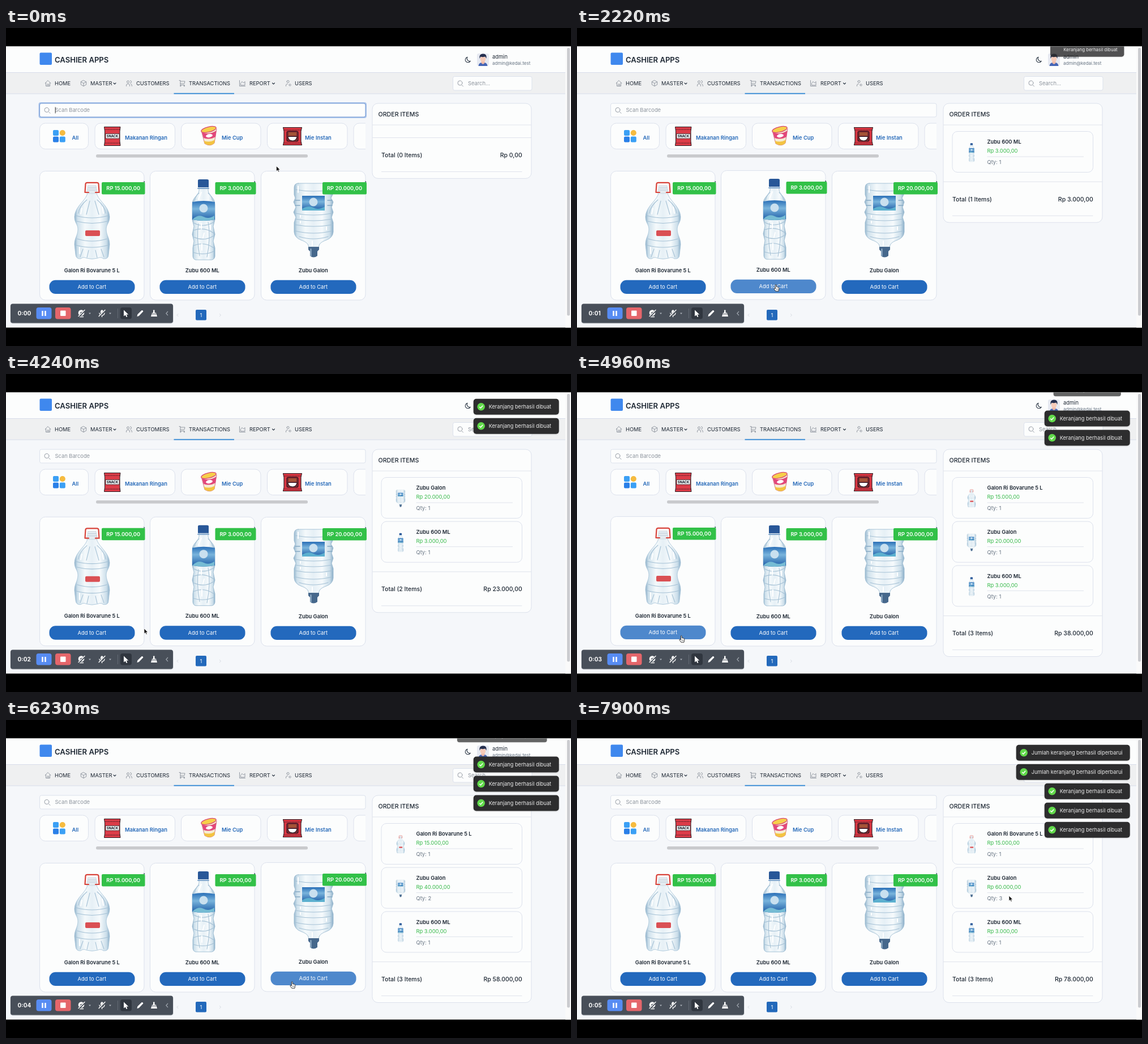
Recreate the animation shown at these times as an HTML page. Size 998x561 px, loop 8 s.

```html
<!DOCTYPE html>
<html lang="id">
<head>
<meta charset="utf-8">
<title>Cashier Apps</title>
<style>
  html, body { margin: 0; width: 100%; height: 100%; overflow: hidden; background: #000; }
  svg { display: block; width: 998px; height: 561px; }
  text { font: 400 9.33px Inter, "Open Sans", sans-serif; fill: #1d2733; white-space: pre; }
  .semi { font-weight: 600; }
  .big { font-size: 10.67px; font-weight: 500; }
  .mid { text-anchor: middle; }
  .end { text-anchor: end; }
  .white { fill: #fff; }
  .blue { fill: #2468b8; }
  .green { fill: #35b948; }
  .soft { fill: #667382; }
  .hint { fill: #8d949d; }
  .box { fill: #fcfdfd; stroke: #dce1ec; }
  .rule { stroke: #dfe3ec; fill: none; }
  .icon { fill: none; stroke: #858c96; stroke-width: .85; stroke-linecap: round; stroke-linejoin: round; }
  .rib { fill: none; stroke: #a5c1d5; stroke-width: 1.1; }
  .shine { fill: none; stroke: #fff; stroke-width: 2; }
</style>
</head>
<body>
<svg viewBox="0 0 998 561">
  <defs>
    <clipPath id="screen"><rect y="32.5" width="998" height="496"/></clipPath>
    <clipPath id="strip"><rect x="58" y="160" width="577" height="60"/></clipPath>
    <linearGradient id="glass">
      <stop offset="0" stop-color="#8fb1ca"/><stop offset=".09" stop-color="#cfe1ec"/>
      <stop offset=".3" stop-color="#f4f9fb"/><stop offset=".5" stop-color="#e6f0f6"/>
      <stop offset=".72" stop-color="#f6fafc"/><stop offset=".91" stop-color="#cbdeea"/>
      <stop offset="1" stop-color="#8baec8"/>
    </linearGradient>
    <linearGradient id="label" x2="0" y2="1">
      <stop offset="0" stop-color="#2a6fb7"/><stop offset=".4" stop-color="#79b4dc"/>
      <stop offset="1" stop-color="#1c5ba6"/>
    </linearGradient>

    <g id="bottle0" stroke-linecap="round">
      <path d="M144 290C144 303 122 313 121 333C121 344 127 346 127 355C127 366 121 370 121 382L123 400Q124 408 132 407Q137 403 142 406Q152 409 162 406Q167 403 172 407Q181 408 181 400L183 382C183 370 177 366 177 355C177 346 183 344 183 333C182 313 160 303 160 290Z" fill="url(#glass)" stroke="#a3c1d6" stroke-width=".8"/>
      <path class="rib" d="M123 331Q152 339 181 331M125 341Q152 348 179 341M126 372Q152 380 178 372M123 383Q152 391 181 383M131 404L136 390M143 405L146 392M161 405L158 392M173 404L168 390M143 303Q129 315 128 327M161 303Q175 315 176 327M148 305L142 329M157 305L164 329"/>
      <path class="shine" d="M134 318L132 328M170 316L172 327M130 387V398"/>
      <path d="M145 278H159L161 292H143Z" fill="#e4ebf0" stroke="#c1ced8" stroke-width=".7"/>
      <path d="M145 282H159M144.5 286H160" stroke="#b4c5d2" stroke-width=".8"/>
      <path d="M139.5 290L140.5 275Q141 272.8 143.5 272.8H160.5Q163 272.8 163.5 275L164.5 290H158M139.5 290H146" fill="none" stroke="#d8433a" stroke-width="2.2"/>
      <rect x="140" y="357" width="26" height="10" rx="2" fill="#da5054"/>
    </g>

    <g id="bottle1" stroke-linecap="round">
      <path d="M341 280V287C340 296 329 298 329 312V338L332 350L329 364L332 376L330 388V403Q331 410 338 409H360Q368 410 369 403V388L366 376L369 364L366 350L369 338V312C369 298 358 296 357 287V280Z" fill="url(#glass)" stroke="#94b5cd" stroke-width=".8"/>
      <path class="rib" d="M332 344Q348 353 366 343M331 357Q350 350 367 362M332 369Q350 377 366 367M331 384Q350 376 367 388M331 396Q350 402 367 394M340 345Q336 370 342 402M357 342Q362 370 355 404M341 291Q334 297 333 305M357 291Q364 297 365 305"/>
      <path class="shine" d="M345 345V354M350 362L348 370M346 381V392M361 348V355M345 290L340 302"/>
      <path d="M339 269Q339 267 342 267H355Q358 267 358 269V281H339Z" fill="#285798"/>
      <path d="M339 283H358" stroke="#7ba2ca" stroke-width="2"/>
      <path d="M329 307Q349 303 369 307V338Q349 342 329 338Z" fill="url(#label)"/>
      <circle cx="349" cy="318" r="7.5" fill="#c9e0ef"/>
      <path d="M330 337Q340 328 349 333T368 331V338Q349 342 330 338Z" fill="#76bcd4"/>
    </g>

    <g id="bottle2" stroke-linecap="round">
      <path d="M516 274H570Q577 274 577 282V294L574 300L578 307L575 316L578 325L575 334L578 343V360Q577 370 566 374C555 378 553 381 552 388H535C534 381 532 378 521 374Q510 370 509 360V343L512 334L508 325L512 316L508 307L511 300L509 294V282Q509 274 516 274Z" fill="url(#glass)" stroke="#94b5cd" stroke-width=".8"/>
      <path class="rib" d="M511 285Q543 291 576 285M511 327Q543 333 576 327M511 337Q543 343 576 337M510 347Q543 353 577 347M511 358Q543 366 576 358M518 368Q543 376 569 368"/>
      <path d="M511 304H519M511 313H519M568 304H576M568 313H576" stroke="#86aac5" stroke-width="1.5"/>
      <path class="shine" d="M516 279V290M520 331V334M520 341V344M566 351V356M541 376V384"/>
      <path d="M534 386H553V391L550 394V402Q543 407 537 402V394L534 391Z" fill="#46688c"/>
      <path d="M538.5 390V402" stroke="#9ab6cd" stroke-width="2"/>
      <rect x="523" y="296" width="40" height="26" fill="url(#label)"/>
      <circle cx="543" cy="307" r="7.5" fill="#c9e0ef"/>
      <path d="M523 319Q534 312 543 317T563 315V322H523Z" fill="#5cb0cf"/>
    </g>

    <g id="arrow"><path d="M0 0V9.3L2.2 7.3L3.7 10.5L5.2 9.8L3.8 6.7H6.7Z" fill="#111" stroke="#fff" stroke-width=".7"/></g>
    <g id="hand"><path d="M-1.6 -5Q-.6 -5.9 .3 -4.8V-1.4L3.6 -.7Q5 -.3 4.8 1.2L4 6.2H-1.2L-4 2.2Q-4.2 .9 -2.9 1.1L-1.6 2Z" fill="#fff" stroke="#222" stroke-width=".9"/><path d="M.4 1.5V4M2.4 1.5V4" stroke="#222" stroke-width=".6"/></g>
    <g id="beam"><path d="M-1.8 -5Q0 -5 0 -4V4Q0 5 -1.8 5M1.8 -5Q0 -5 0 -4M0 4Q0 5 1.8 5M-1 1.5H1" fill="none" stroke="#333" stroke-width=".9"/></g>
  </defs>

  <g clip-path="url(#screen)">
    <rect y="32" width="998" height="497" fill="#f5f7fa"/>
    <rect y="32" width="988" height="46.5" fill="#fcfdfd"/>
    <rect y="78.5" width="988" height="37.5" fill="#eff0f1"/>
    <path class="rule" d="M0 78.5H988M0 116H988" style="stroke:#d8ddea"/>

    <!-- header -->
    <rect x="59.5" y="43.5" width="21.5" height="21.5" rx="2" fill="#3f88ee"/>
    <text class="semi" x="86" y="60.5" style="font-size:13.1px">CASHIER APPS</text>
    <path class="icon" d="M815 51.3A4.8 4.8 0 1 0 820.3 58.2A4.6 4.6 0 0 1 815 51.3Z" style="stroke:#2a3644;stroke-width:1.1"/>
    <rect x="832" y="45" width="21" height="22" rx="3" fill="#e6e9f1"/>
    <path d="M834.5 67Q835 60.5 842.5 60.5T850.5 67Z" fill="#4465b5"/>
    <path d="M839.5 57H845.5V62L842.5 64L839.5 62Z" fill="#efb9a6"/>
    <ellipse cx="842.5" cy="54.5" rx="4.8" ry="5.3" fill="#f6cbb9"/>
    <path d="M836.5 54Q835 46 842 45.5Q850 45 848.5 54L846.5 50.5Q841 52 838.5 50.5Z" fill="#26304f"/>
    <text x="859" y="53.5">admin</text>
    <text class="soft" x="859" y="64.5" style="font-size:8px">admin@kedai.test</text>

    <!-- navigation -->
    <g id="nav"></g>
    <path d="M296.5 115.6H403" stroke="#2e86d3" stroke-width="1.6"/>
    <rect class="box" x="789.5" y="85.5" width="139.5" height="24.5" rx="3"/>
    <path class="icon" d="M805 100.5L807.5 103M806 97A4 4 0 1 1 798 97A4 4 0 1 1 806 97"/>
    <text class="hint" x="816" y="101">Search…</text>

    <!-- barcode field -->
    <rect id="ring" x="57.5" y="131" width="579.5" height="28" rx="4" fill="#a9c3ea"/>
    <rect id="field" class="box" x="59.5" y="133" width="575.5" height="24" rx="3"/>
    <path class="icon" d="M75.5 148L78 150.5M76 144.5A4 4 0 1 1 68 144.5A4 4 0 1 1 76 144.5"/>
    <text class="hint" x="86.5" y="148.3">Scan Barcode</text>
    <path id="caret" d="M87.2 139.5V150.5" stroke="#222" stroke-width=".9"/>

    <!-- categories -->
    <g id="pills" clip-path="url(#strip)"></g>
    <g>
      <rect x="83" y="180" width="10" height="10" rx="2" fill="#3ba0f5"/>
      <circle cx="99.8" cy="185" r="5.1" fill="#f6bb3f"/>
      <rect x="83" y="191.5" width="10" height="10" rx="2" fill="#2a80e8"/>
      <rect x="94.8" y="191.5" width="10" height="10" rx="2" fill="#3ba0f5"/>
    </g>
    <g stroke="#2c1a20" stroke-linejoin="round">
      <path d="M173.5 174.5H202L201 182V200L202 207.5H173.5L174.5 200V182Z" fill="#dc3c48"/>
      <path d="M174 179H201.5M174 203H201.5" stroke-dasharray="1.5 1"/>
      <rect x="176" y="186.5" width="24" height="8.5" fill="#fff" stroke-width=".8"/>
    </g>
    <text class="mid" x="188" y="192.8" style="font-size:5.6px;font-weight:800">SNACK</text>
    <g stroke-width=".8">
      <path d="M345 181L351 204Q361 210 368 203L372 178Z" fill="#f6ecd2" stroke="#c9536f"/>
      <path d="M346 184Q360 189 371.5 181L370 192Q360 198 349 194Z" fill="#e2487b"/>
      <path d="M349.5 199Q360 203 369 197L368 203Q361 210 351 204Z" fill="#f3c442"/>
      <ellipse cx="359" cy="190" rx="6" ry="3" fill="#fff" transform="rotate(-10 359 190)"/>
      <ellipse cx="358" cy="179" rx="13.5" ry="4.6" fill="#f6cf4a" stroke="#d84a75" stroke-width="1.3" transform="rotate(-14 358 179)"/>
    </g>
    <g stroke="#2c1a20" stroke-width="1.1" stroke-linejoin="round">
      <path d="M489.5 175.5H522.5L521 182V200L522.5 206.5H489.5L491 200V182Z" fill="#d93642"/>
      <path d="M490 180H522M490 203H522" stroke-dasharray="1.5 1"/>
      <rect x="496" y="182" width="20" height="18" rx="3" fill="#7c2730"/>
      <path d="M499 185.5H513M499 188.5H513" stroke="#f0a744"/>
      <path d="M498 191.5H514Q513 199 506 199T498 191.5Z" fill="#fff"/>
    </g>
    <rect x="159" y="223" width="374" height="5.5" rx="2.5" fill="#c9cacd"/>

    <g id="cards"></g>

    <!-- pagination -->
    <rect x="335" y="497" width="19" height="18.5" rx="2" fill="#2369bb"/>
    <text class="mid white" x="344.5" y="509.5">1</text>
    <path class="icon" d="M304 504.5L302 506.5L304 508.5M377.5 504.5L379.5 506.5L377.5 508.5" style="stroke:#cfd4db"/>

    <g id="order"></g>

    <rect x="988" y="32" width="10" height="497" fill="#fafafa"/>
    <rect x="991" y="35" width="5" height="472.5" rx="2.5" fill="#cbccd0"/>

    <!-- recorder -->
    <rect x="7" y="487" width="289" height="35" rx="5" fill="#1d2733" opacity=".1"/>
    <rect x="8" y="486.5" width="287" height="34" rx="4" fill="#484f59"/>
    <text id="clock" class="white" x="20.6" y="506.7" style="font-size:10px;font-weight:700"></text>
    <rect x="53.5" y="493" width="27" height="20.5" rx="4" fill="#578cf3"/>
    <path d="M64.5 499V508M69.5 499V508" stroke="#fff" stroke-width="2.6"/>
    <rect x="87" y="493" width="27.5" height="20.5" rx="4" fill="#e5666b"/>
    <rect x="96" y="498.5" width="9.5" height="9.5" rx="1" fill="#fff"/>
    <g fill="none" stroke="#fff" stroke-width="1.4" stroke-linecap="round">
      <circle cx="133" cy="502.5" r="4.6" fill="#fff"/>
      <circle cx="133" cy="502.5" r="1.7" fill="#484f59" stroke="none"/>
      <path d="M129.5 509.5H136.5"/>
      <path d="M167.8 499.5Q169.5 496.5 171.2 499.5V503Q169.5 506 167.8 503Z" fill="#fff"/>
      <path d="M165 503Q165.5 507 169.5 507T174 503M169.5 507V509.5"/>
      <path d="M128.5 509L139 498.5M164.5 509L175 498.5" stroke="#484f59" stroke-width="3.4"/>
      <path d="M128 508.5L139 497.5M164 508.5L175 497.5"/>
    </g>
    <path d="M146 502.5H150L148 505ZM182 502.5H186L184 505Z" fill="#aeb4bc"/>
    <path d="M197.5 495V512" stroke="#636a74"/>
    <rect x="202" y="493" width="20" height="20.5" rx="4" fill="#30363f"/>
    <path d="M208 497.5V508.5L210.8 506.2L212.6 510L214.4 509.2L212.7 505.5H216.3Z" fill="#fff"/>
    <path d="M231.5 509L232.3 505.3L239.5 498.2Q241 497.5 242 499T241.5 501L234.8 508Z" fill="#fff"/>
    <path d="M260 497.5H262.5V502.5H265L267 509H256L258 502.5H260Z" fill="#fff"/>
    <path d="M257.5 504.5H265.5" stroke="#484f59"/>
    <path d="M286 500L282.8 503.5L286 507" fill="none" stroke="#9da4ad" stroke-width="1.2"/>

    <g id="toasts"></g>
    <use id="cursor"/>
  </g>
</svg>

<script>
const LOOP = 8000;
const $ = id => document.getElementById(id);
const clamp = v => Math.max(0, Math.min(1, v));

const products = [
  { name: "Galon Ri Bovarune 5 L", price: 15000, x: 59.5, tag: 169, tagW: 76.5, mid: [152, 340] },
  { name: "Zubu 600 ML", price: 3000, x: 254.5, tag: 369.5, tagW: 72, mid: [349, 338] },
  { name: "Zubu Galon", price: 20000, x: 450.5, tag: 559, tagW: 78, mid: [543.5, 339] }
];

// [time, product] of each completed add
const adds = [[2100, 1], [3620, 2], [4890, 0], [6160, 2], [6950, 2]];
const clockTicks = [1500, 2950, 4400, 5850, 7300];
const blurAt = 650;

// [time, x, y]
const track = [
  [0, 477.5, 243.5], [450, 477.5, 243.5], [1270, 370, 430], [1600, 352, 458], [2650, 352, 458],
  [3100, 515, 458], [3720, 515, 458], [4200, 244, 449], [4260, 244, 449], [4620, 185, 467],
  [5200, 185, 467], [5850, 506, 467], [7050, 506, 467], [7650, 763, 310], [LOOP, 763, 310]
];

const money = n => String(n).replace(/\B(?=(\d{3})+$)/g, ".") + ",00";

// cubic-bezier(.21, 1.02, .73, 1)
function spring(x) {
  x = clamp(x);
  const curve = (a, b, u) => 3 * (1 - u) ** 2 * u * a + 3 * (1 - u) * u * u * b + u ** 3;
  let lo = 0, hi = 1;
  for (let i = 0; i < 18; i++) {
    const u = (lo + hi) / 2;
    if (curve(.21, .73, u) < x) lo = u; else hi = u;
  }
  return curve(1.02, 1, lo);
}

function pointer(t) {
  t = Math.max(0, t);
  const i = Math.max(1, track.findIndex(k => k[0] >= t));
  const [t0, x0, y0] = track[i - 1], [t1, x1, y1] = track[i];
  const u = (t - t0) / (t1 - t0), e = u * u * (3 - 2 * u);
  return [x0 + (x1 - x0) * e, y0 + (y1 - y0) * e];
}

const inside = ([x, y], l, top, w, h) => x >= l && x <= l + w && y >= top && y <= top + h;
const onCard = (p, c) => inside(p, c.x, 252.5, 184.5, 227);
const onButton = (p, c) => inside(p, c.x + 17, 445, 151, 24);
const onName = (p, c) => inside(p, c.x + 60, 421, 66, 11);

// hover weight, averaged over a short transition
function hover(t, test, card) {
  let sum = 0;
  for (let k = 0; k < 6; k++) sum += test(pointer(t - k * 25), card);
  return sum / 6;
}

$("nav").innerHTML = [
  ["HOME", 86, 74, "M-5 0L0 -5L5 0M-3.5 -1V5H3.5V-1M-1 5V1.5H1.5V5"],
  ["MASTER", 149, 137, "M0 -5L4.7 -2.5V2.5L0 5L-4.7 2.5V-2.5ZM-4.7 -2.5L0 0L4.7 -2.5M0 0V5"],
  ["CUSTOMERS", 230, 217.5, "M-4 -2.5A2 2 0 1 1 0 -2.5A2 2 0 1 1 -4 -2.5M-5 5V3.5Q-5 1 -2 1T1 3.5V5M2 -4.6A2 2 0 0 1 2 -.5M3 1Q5 1.5 5 5"],
  ["TRANSACTIONS", 323, 311, "M-5 -5H-3V3H4M-3 -3.5H5L4 .5H-3M-2 4.5A.7 .7 0 1 0 -3.3 4.5A.7 .7 0 1 0 -2 4.5M4.5 4.5A.7 .7 0 1 0 3.2 4.5A.7 .7 0 1 0 4.5 4.5"],
  ["REPORT", 430, 417.5, "M-5 -5V5H5M-3 3V0L-.5 -3L2 -.5L4.5 -3V3Z"],
  ["USERS", 510, 498.5, "M-2.5 -3A2 2 0 1 1 1.5 -3A2 2 0 1 1 -2.5 -3M-4 5V3.5Q-4 1 -1 1M1.5 3A1.6 1.6 0 1 0 4.7 3A1.6 1.6 0 1 0 1.5 3"]
].map(([label, x, ix, d]) =>
  `<path class="icon" transform="translate(${ix} 97.5)" d="${d}"/><text x="${x}" y="101.2">${label}</text>`
).join("") + `<path class="icon" d="M190 97L192 99L194 97M470.5 97L472.5 99L474.5 97" style="stroke:#2a3644;stroke-width:1.1"/>`;

$("pills").innerHTML = [
  [59.5, 86, "All", 116.5], [157, 141.5, "Makanan Ringan", 210], [309.5, 140.5, "Mie Cup", 381],
  [461.5, 141.5, "Mie Instan", 528], [614, 120, "", 0]
].map(([x, w, label, tx]) =>
  `<rect class="box" x="${x}" y="168" width="${w}" height="45.5" rx="10"/><text class="semi blue" x="${tx}" y="196.7">${label}</text>`
).join("");

$("cards").innerHTML = products.map((c, i) => {
  const cx = c.x + 92.3;
  return `<g>
    <rect class="box" x="${c.x}" y="252.5" width="184.5" height="227.5" rx="10"/>
    <use href="#bottle${i}"/>
    <path d="M${c.x + 184} 269.5L${c.x + 186.2} 272H${c.x + 184}Z" fill="#1d3b45"/>
    <rect x="${c.tag}" y="272" width="${c.tagW}" height="21.5" rx="2" fill="#32c148"/>
    <text class="semi white mid" x="${c.tag + c.tagW / 2}" y="286">RP ${money(c.price)}</text>
    <text class="semi mid" x="${cx}" y="430.7">${c.name}</text>
    <rect class="btn" x="${c.x + 17}" y="444.7" width="151" height="24.3" rx="11"/>
    <text class="white mid" x="${cx}" y="460.2">Add to Cart</text></g>`;
}).join("");
const cardNodes = [...$("cards").children];

// cart contents after each add, newest product first
const carts = [[]];
const messages = adds.map(([, id]) => {
  const cart = carts.at(-1).map(line => ({ ...line }));
  const line = cart.find(l => l.id === id);
  if (line) line.qty++; else cart.unshift({ id, qty: 1 });
  carts.push(cart);
  return line ? ["Jumlah keranjang berhasil diperbarui", 201] : ["Keranjang berhasil dibuat", 151];
});

function orderLine({ id, qty }, i) {
  const { name, price, mid } = products[id];
  return `<g transform="translate(0 ${182.5 + i * 77.7})">
    <rect class="box" x="663" width="248.5" height="72" rx="9"/>
    <use href="#bottle${id}" transform="translate(697 37) scale(.23) translate(${-mid[0]} ${-mid[1]})"/>
    <text class="semi" x="724.5" y="21.7">${name}</text>
    <text class="green" x="724.5" y="37.7">Rp ${money(price * qty)}</text>
    <path class="rule" d="M724.5 44.5H895"/>
    <text class="soft" x="724.5" y="57.7">Qty: ${qty}</text></g>`;
}

function orderPanel(cart) {
  const dy = cart.length * 77.7;
  const total = cart.reduce((sum, l) => sum + products[l.id].price * l.qty, 0);
  return `<rect class="box" x="647" y="133" width="281" height="${132.4 + dy}" rx="10"/>
    <text class="big" x="657.5" y="156.3">ORDER ITEMS</text>
    <path class="rule" d="M647 171H928M647 ${193.5 + dy}H928M663 ${253.5 + dy}H911.5"/>
    ${cart.map(orderLine).join("")}
    <text class="big semi" x="663" y="${227.8 + dy}" style="font-size:10.5px">Total (${cart.length} Items)</text>
    <text class="big semi end" x="911.7" y="${227.8 + dy}" style="font-size:10.5px">Rp ${money(total)}</text>`;
}

$("toasts").innerHTML = messages.map(([label, w]) => `<g>
  <rect x="${-w / 2 - 1}" y="-13" width="${w + 2}" height="29" rx="6" opacity=".06"/>
  <rect x="${-w / 2}" y="-14" width="${w}" height="28" rx="5" fill="#2d2d2e"/>
  <g class="tick"><circle r="6.8" fill="#61d94a"/><path d="M-3 .3L-.8 2.4L3 -2" fill="none" stroke="#fff" stroke-width="1.5"/></g>
  <text x="${-w / 2 + 27}" y="3.3" style="fill:#ececec;font-size:9.2px">${label}</text></g>`).join("");
const toastNodes = [...$("toasts").children];

function drawToasts(t) {
  toastNodes.forEach((node, i) => {
    const age = t - adds[i][0], w = messages[i][1];
    node.style.display = age < 0 ? "none" : "";
    if (age < 0) return;
    const p = spring(age / 480), scale = .6 + .4 * p;
    const pushed = adds.slice(i + 1).reduce((y, [at]) => y + 34 * spring((t - at) / 320), 0);
    node.setAttribute("transform", `translate(${976.7 - w / 2} ${57.7 + pushed - 56 * (1 - p)}) scale(${scale})`);
    node.setAttribute("opacity", .5 + .5 * p);
    node.querySelector(".tick").setAttribute("transform",
      `translate(${-w / 2 + 13.5} 0) scale(${spring((age - 140) / 420)})`);
  });
}

let shownCart = -1;
function draw(t) {
  const at = pointer(t);
  const focused = t < blurAt;
  $("ring").style.display = $("caret").style.display = focused ? "" : "none";
  $("field").style.stroke = focused ? "#7399d3" : "";

  cardNodes.forEach((node, i) => {
    const c = products[i];
    node.setAttribute("transform", `translate(0 ${-hover(t, onCard, c)})`);
    const h = hover(t, onButton, c);
    const mix = (a, b) => Math.round(a + (b - a) * h);
    node.querySelector(".btn").setAttribute("fill", `rgb(${mix(35, 78)},${mix(105, 136)},${mix(189, 204)})`);
  });

  const count = adds.filter(([time]) => time <= t).length;
  if (count !== shownCart) $("order").innerHTML = orderPanel(carts[shownCart = count]);
  $("clock").textContent = "0:0" + clockTicks.filter(time => time <= t).length;
  drawToasts(t);

  const shape = products.some(c => onButton(at, c)) ? "hand" : products.some(c => onName(at, c)) ? "beam" : "arrow";
  $("cursor").setAttribute("href", "#" + shape);
  $("cursor").setAttribute("transform", `translate(${at[0]} ${at[1]})`);
}

const start = performance.now();
function frame() {
  draw((performance.now() - start) % LOOP);
  requestAnimationFrame(frame);
}
frame();
</script>
</body>
</html>
```
